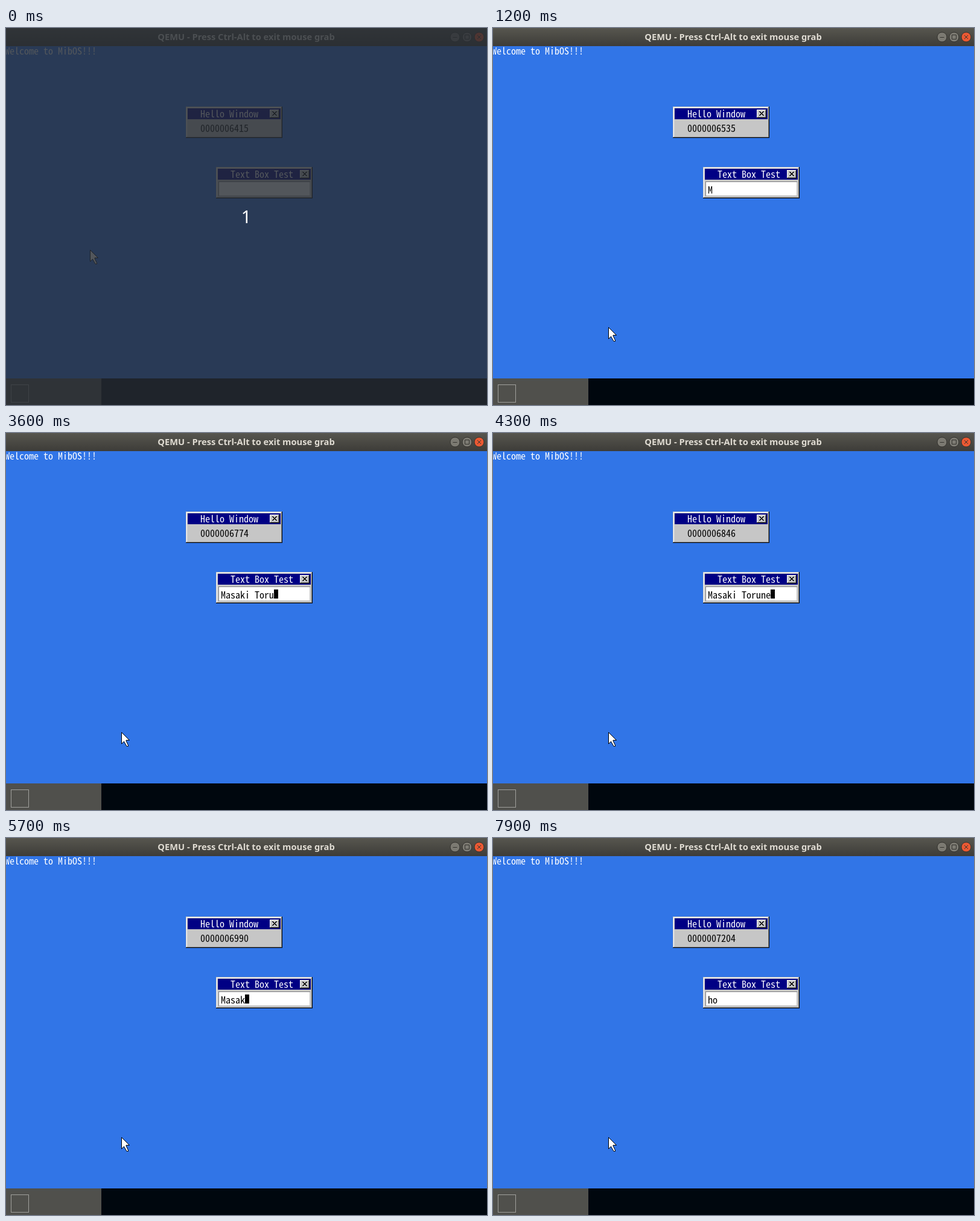
Write an HTML page with a canvas that moves like this. It is 797 px wide and 624 px high and loops after 8000 ms.

```html
<!DOCTYPE html>
<html lang="en">
<head>
<meta charset="utf-8">
<title>Text box test</title>
<style>
html, body { margin: 0; width: 797px; height: 624px; overflow: hidden; }
canvas { display: block; }
</style>
</head>
<body>
<canvas id="stage" width="797" height="624"></canvas>
<script>
const ctx = document.getElementById('stage').getContext('2d');
const LOOP = 8000, STEP = 100;
const GREY = '#c6c6c6', SHADE = '#848484', NAVY = '#000084';
const NAME = 'Masaki Torune';

// Key presses: time in ms and the text left in the box
const keys = [];
[800, 1500, 1900, 2100, 2250, 2500, 2700, 2900, 3100, 3300, 3500, 3800, 4000]
  .forEach((time, i) => keys.push({ time, text: NAME.slice(0, i + 1) }));
for (let i = 1; i <= NAME.length; i++)
  keys.push({ time: 4500 + 150 * i, text: NAME.slice(0, -i) });
keys.push({ time: 6850, text: 'h' }, { time: 7100, text: 'ho' });

// The guest clock runs at about 100 ticks a second
const clock = [[0, 6415], [100, 6425], [2300, 6644], [3600, 6774],
  [5000, 6918], [6500, 7072], [7900, 7204]];

function ticks(t) {
  let i = 1;
  while (i < clock.length - 1 && t > clock[i][0]) i++;
  const [t0, c0] = clock[i - 1], [t1, c1] = clock[i];
  return Math.round(c0 + (c1 - c0) * (t - t0) / (t1 - t0));
}

function rect(x, y, w, h, color) {
  ctx.fillStyle = color;
  ctx.fillRect(x, y, w, h);
}

// Console text in 8 x 16 cells
function print(text, x, y, color) {
  ctx.font = '16px "Noto Sans Mono CJK JP", "Noto Sans CJK JP", "Noto Sans Mono", monospace';
  ctx.textAlign = 'center';
  ctx.fillStyle = color;
  [...text].forEach((ch, i) => ctx.fillText(ch, x + 4 + 8 * i, y + 14));
}

function label(text, x, y, font, color) {
  ctx.font = font;
  ctx.textAlign = 'center';
  ctx.fillStyle = color;
  ctx.fillText(text, x, y);
}

function closeButton(x, y) {
  rect(x, y, 16, 14, '#000');
  rect(x, y, 15, 13, '#fff');
  rect(x + 1, y + 1, 14, 12, SHADE);
  rect(x + 1, y + 1, 13, 11, GREY);
  for (let i = 0; i < 7; i++) {
    rect(x + 4 + i, y + 3 + i, 2, 1, '#000');
    rect(x + 10 - i, y + 3 + i, 2, 1, '#000');
  }
}

function windowFrame(x, y, title) {
  const w = 160, h = 52;
  rect(x, y, w, h, '#000');
  rect(x, y, w - 1, h - 1, GREY);
  rect(x + 1, y + 1, w - 2, h - 2, SHADE);
  rect(x + 1, y + 1, w - 3, h - 3, '#fff');
  rect(x + 2, y + 2, w - 4, h - 4, GREY);
  rect(x + 3, y + 3, w - 6, 18, NAVY);
  print(title, x + 24, y + 4, '#fff');
  closeButton(x + w - 21, y + 5);
}

function textBox(x, y, w, h) {
  rect(x, y, w, h, GREY);
  rect(x, y, w, 1, SHADE);
  rect(x, y, 1, h, SHADE);
  rect(x + 1, y + 1, w - 2, h - 2, '#fff');
}

function pointer(x, y) {
  const shape = new Path2D('M.5 .5V19.5L4.5 15.5L9 23.5H11.5V22L8 14.5V13.5H13.5Z');
  ctx.save();
  ctx.translate(x, y);
  ctx.fillStyle = '#fff';
  ctx.strokeStyle = '#000';
  ctx.lineWidth = 1;
  ctx.fill(shape);
  ctx.stroke(shape);
  ctx.restore();
}

function titleButton(x, color, glyph) {
  ctx.beginPath();
  ctx.arc(x, 15, 8, 0, 2 * Math.PI);
  ctx.fillStyle = color;
  ctx.fill();
  ctx.strokeStyle = '#34332f';
  ctx.lineWidth = 1;
  ctx.stroke();
  ctx.stroke(new Path2D(`M${x} 15${glyph}`));
}

function titleBar() {
  const shade = ctx.createLinearGradient(0, 0, 0, 30);
  shade.addColorStop(0, '#57564f');
  shade.addColorStop(1, '#3d3c38');
  rect(0, 0, 797, 30, shade);
  label('QEMU - Press Ctrl-Alt to exit mouse grab', 398, 20,
    'bold 14.667px "Noto Sans", sans-serif', '#dfdbd2');
  titleButton(744, '#7c7a72', 'm-3.5 .5h7');
  titleButton(764, '#7c7a72', 'm-3.5 -3.5h7v7h-7z');
  titleButton(784, '#ea5933', 'm-3 -3l6 6m0 -6l-6 6');
}

function draw(t) {
  const now = ticks(t);
  const key = keys.filter(k => k.time <= t).pop();
  const text = key ? key.text : '';
  // The caret toggles every 50 ticks; a key press shows it until the next toggle
  const half = Math.floor(now / 50);
  const caret = half % 2 === 1 || (key && Math.floor(ticks(key.time) / 50) === half);

  rect(0, 30, 797, 550, '#3175e7');
  rect(0, 580, 797, 44, '#00070e');
  rect(0, 580, 158, 44, '#50504c');
  ctx.strokeStyle = '#a0a09c';
  ctx.lineWidth = 1;
  ctx.strokeRect(8.5, 590.5, 29, 29);
  print('Welcome to MibOS!!!', -2, 30, '#fff');

  windowFrame(298, 130, 'Hello Window');
  print(String(now).padStart(10, '0'), 322, 158, '#000');

  windowFrame(348, 230, 'Text Box Test');
  textBox(352, 254, 152, 24);
  print(text, 356, 260, '#000');
  if (caret) rect(356 + 8 * text.length, 259, 7, 15, '#000');

  titleBar();
  if (t < 100) {
    pointer(139, 367);
    rect(0, 0, 797, 624, 'rgba(39, 44, 51, .8)');
    label('1', 398, 323, '29px "Noto Sans", sans-serif', '#fff');
  } else {
    pointer(191, 495);
  }
}

const start = performance.now();
function frame() {
  const t = (performance.now() - start) % LOOP;
  draw(Math.floor(t / STEP) * STEP);
  requestAnimationFrame(frame);
}
frame();
</script>
</body>
</html>
```
